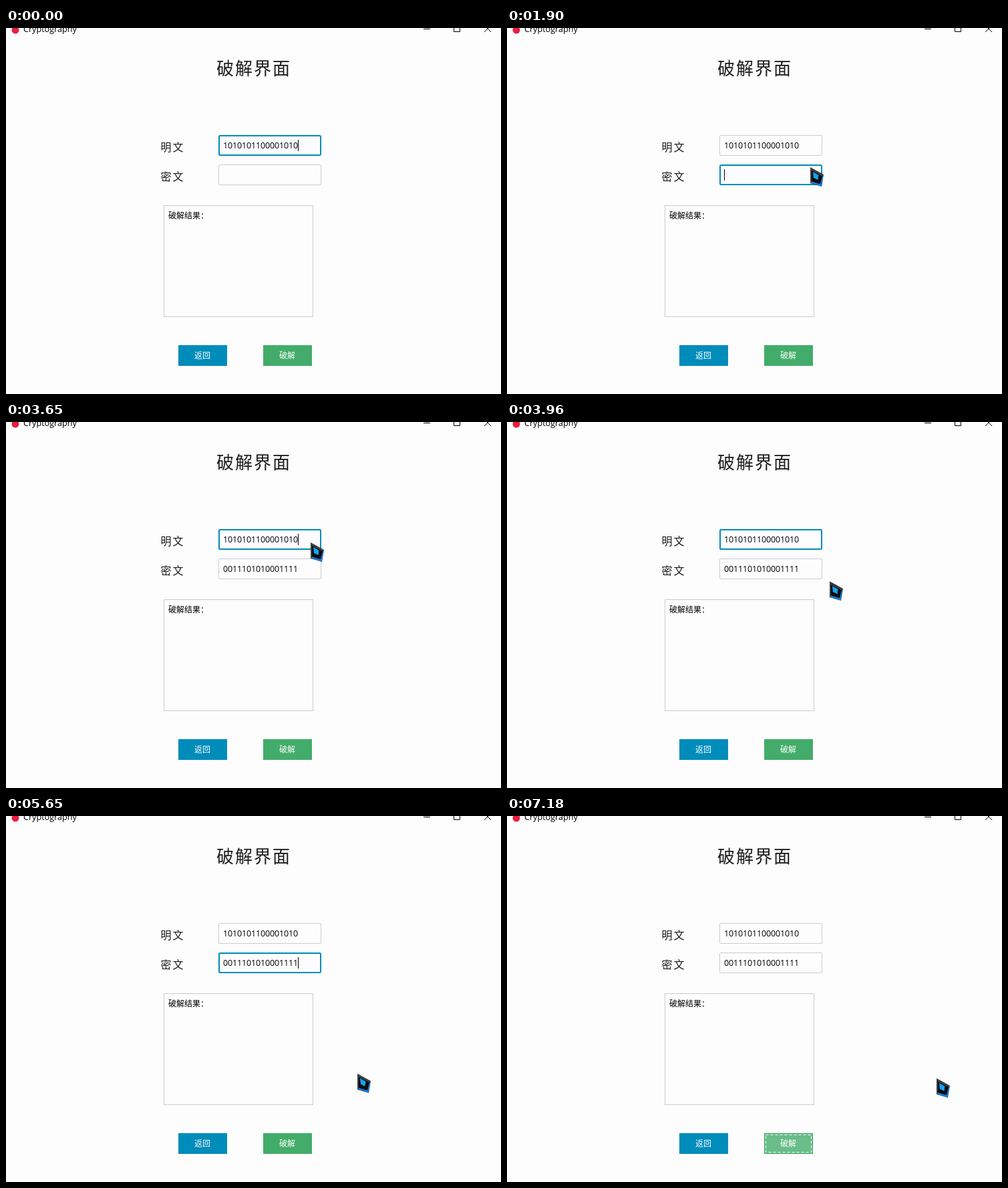
An HTML page for the animation above (8000 ms loop, 741 by 547 pixels).

```html
<!DOCTYPE html>
<html lang="zh-CN">
<head>
<meta charset="utf-8">
<style>
html, body { margin: 0; width: 100%; height: 100%; overflow: hidden; background: #fdfdfd; }
svg { display: block; width: 741px; height: 547px; }
text { font-family: "Noto Sans CJK SC", "Noto Sans CJK", sans-serif; fill: #1c1c1c; }
.latin { font-family: "Open Sans", "Noto Sans", sans-serif; }
.bits { font-size: 12.5px; letter-spacing: -.15px; fill: #000; }
.label { font-size: 16px; letter-spacing: 2px; }
.small { font-size: 12px; }
.on { fill: #fff; }
</style>
</head>
<body>
<svg viewBox="0 0 741 547">
  <rect width="741" height="547" fill="#fdfdfd"/>
  <circle cx="14" cy="3" r="5.5" fill="#ee1c3f"/>
  <text id="caption" class="latin" x="26" y="6" font-size="12.6">Cryptography</text>
  <path id="controls" fill="none" d="M625 1.5h10M670.5-4V5.5h9V-4M716-4L726 6M726-4L716 6"/>

  <text x="315" y="70" font-size="26" letter-spacing="2">破解界面</text>
  <text class="label" x="231.5" y="184">明文</text>
  <text class="label" x="231.5" y="228">密文</text>

  <g id="fields"></g>

  <rect x="236.5" y="265.5" width="223" height="166" fill="none" stroke="#ccc"/>
  <text class="small" x="243" y="285" style="fill:#000">破解结果：</text>

  <rect x="258" y="474" width="73" height="31" fill="#008cba"/>
  <text class="small on" x="282" y="494">返回</text>
  <rect id="crack" x="385.5" y="474.5" width="72" height="30" stroke="#43ac6a"/>
  <rect id="dash" x="387.5" y="476.5" width="68" height="26" fill="none" stroke="#fff" stroke-dasharray="4 3"/>
  <text class="small on" x="409" y="494">破解</text>

  <g id="pointer">
    <path fill="#3d3e40" d="M0 0L20 11L17 29L0 24Z"/>
    <path fill="#0a84ee" d="M1 21.500L13 25L16 17L19.500 13L16.500 28.500L1 23.500Z"/>
    <path fill="#0b0d10" d="M2 5L18 13.500L15 25L2 21Z"/>
    <path fill="#10a5f5" d="M4 7L12.500 12L11.500 19L5 16Z"/>
  </g>
</svg>
<script>
const LOOP = 8000;
const PLAIN = '1010101100001010', CIPHER = '0011101010001111';
const $ = id => document.getElementById(id);

function set(el, attrs) {
  for (const k in attrs) el.setAttribute(k, attrs[k]);
}
function add(parent, tag, attrs) {
  const el = document.createElementNS('http://www.w3.org/2000/svg', tag);
  set(el, attrs);
  return parent.appendChild(el);
}

const fields = [160, 204].map(y => ({
  y,
  box: add($('fields'), 'rect', { rx: 1.5, fill: '#fdfdfd' }),
  text: add($('fields'), 'text', { x: 325, y: y + 20, class: 'latin bits' }),
  caret: add($('fields'), 'rect', { y: y + 7, width: 1, height: 17, fill: '#000' })
}));

// pointer strokes; "via" bends a stroke into a curve
const entry = { at: 1250, pos: [597, 256] };
const moves = [
  { from: 1250, to: 1520, pos: [456, 221] },
  { from: 1670, to: 1900, pos: [454, 208] },
  { from: 2080, to: 2330, pos: [456, 180] },
  { from: 3650, to: 4020, pos: [468, 227], via: [588, 315] },
  { from: 5320, to: 6050, pos: [440, 490], via: [596, 450] },
  { from: 6540, to: 6870, pos: [637, 401] },
  { from: 7120, to: 7180, pos: [643, 392] }
];

// who owns the keyboard, and when the caret last began to blink
const focusSteps = [
  { at: 0, owner: 'plain', blink: 0 },
  { at: 30, owner: null },
  { at: 1670, owner: 'cipher', blink: 1670 },
  { at: 2230, owner: 'plain', blink: 2230 },
  { at: 4520, owner: 'cipher', blink: 4430 },
  { at: 6540, owner: 'crack' }
];

const smooth = k => k * k * (3 - 2 * k);
const within = (v, a, b) => v >= a && v < b;
const inside = (p, x, y, w, h) => !!p && within(p[0], x, x + w) && within(p[1], y, y + h);

function pointerAt(t) {
  if (t < entry.at) return null;
  let p = entry.pos;
  for (const m of moves) {
    if (t < m.from) break;
    const k = smooth(Math.min(1, (t - m.from) / (m.to - m.from))), j = 1 - k;
    p = p.map((a, i) => {
      const b = m.pos[i], c = m.via ? m.via[i] : (a + b) / 2;
      return Math.round(j * j * a + 2 * j * k * c + k * k * b);
    });
  }
  return p;
}

// the last digit is deleted at a and typed again at b
const retyped = (s, t, a, b) => within(t, a, b) ? s.slice(0, -1) : s;

function drawField(f, value, focused, hover, caretOn) {
  const w = focused ? 2 : 1;
  set(f.box, {
    x: 318 + w / 2, y: f.y + w / 2, width: 154 - w, height: 31 - w, 'stroke-width': w,
    stroke: focused ? '#008cba' : hover ? '#fdfdfd' : '#ccc'
  });
  f.text.textContent = value;
  set(f.caret, { x: 325 + value.length * 7, visibility: focused && caretOn ? 'visible' : 'hidden' });
}

function draw(t) {
  const p = pointerAt(t);
  const { owner, blink } = focusSteps.filter(s => s.at <= t).pop();
  $('caption').style.fill = owner ? '#000' : '#999';
  $('controls').setAttribute('stroke', owner ? '#000' : '#888');

  const caretOn = (t - blink) % 900 < 600;
  const values = {
    plain: retyped(PLAIN, t, 3240, 3340),
    cipher: t < 2000 ? '' : retyped(CIPHER, t, 4950, 5040)
  };
  Object.keys(values).forEach((name, i) => drawField(
    fields[i], values[name], owner === name, inside(p, 318, fields[i].y, 154, 31), caretOn));

  const hover = inside(p, 385, 474, 73, 31), pressed = owner === 'crack';
  $('crack').setAttribute('fill', hover ? '#56b479' : pressed ? '#69bd88' : '#43ac6a');
  $('dash').setAttribute('visibility', pressed ? 'visible' : 'hidden');

  set($('pointer'), p
    ? { visibility: 'visible', transform: `translate(${p})` }
    : { visibility: 'hidden' });
}

const start = performance.now();
function tick() {
  draw((performance.now() - start) % LOOP);
  requestAnimationFrame(tick);
}
draw(0);
requestAnimationFrame(tick);
</script>
</body>
</html>
```
